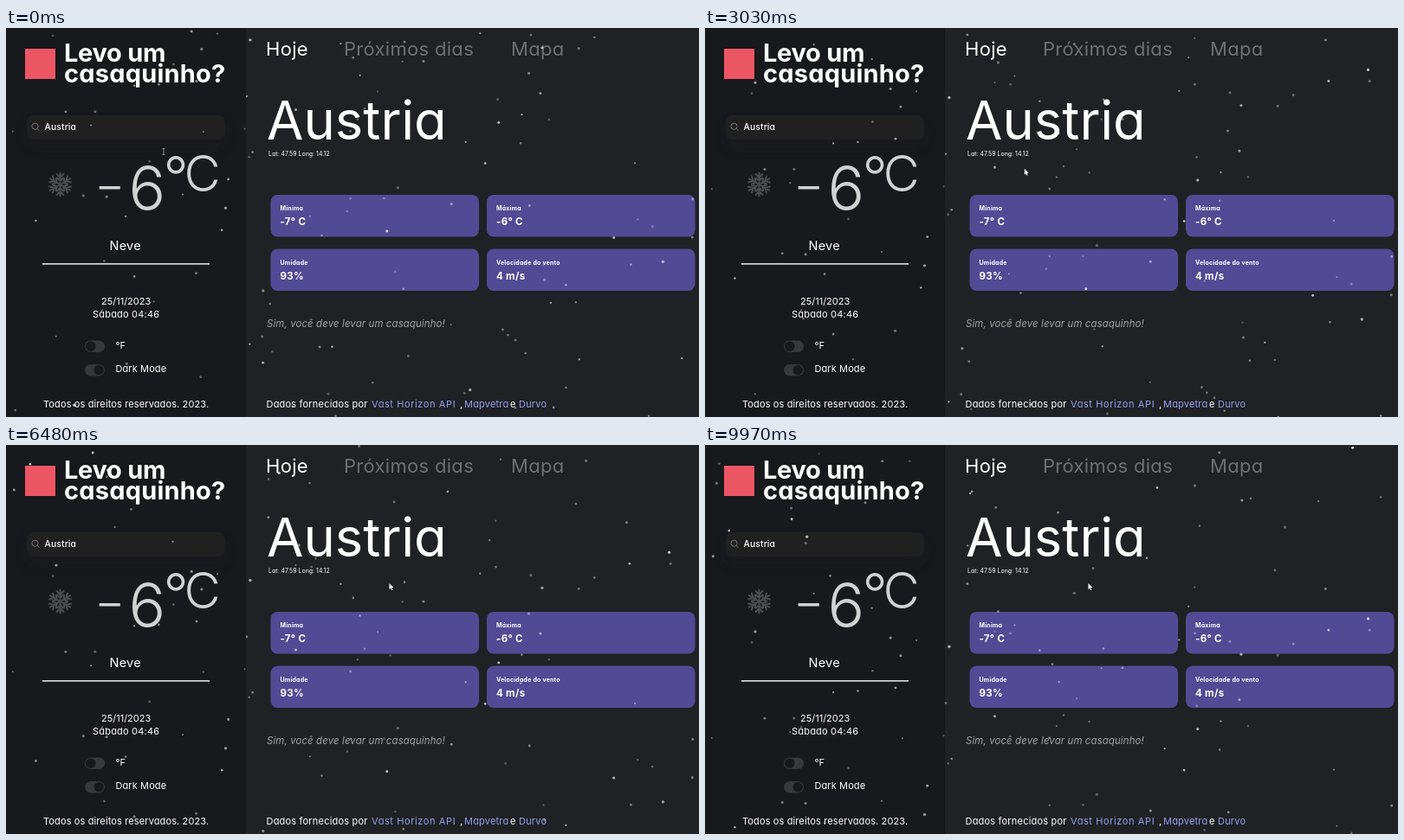
An HTML page with a canvas for the animation above (10 s loop, 800x450 px).

```html
<!DOCTYPE html>
<html lang="pt">
<head>
<meta charset="utf-8">
<title>Levo um casaquinho?</title>
<style>
html, body { margin: 0; width: 100%; height: 100%; overflow: hidden; background: #202124; }
svg, canvas { position: absolute; left: 0; top: 0; width: 800px; height: 450px; }
text {
  font-family: Inter, "Open Sans", sans-serif;
  font-feature-settings: "cv11";
  font-size: 11px;
  fill: #fff;
}
.title { font-size: 29px; font-weight: 700; }
.search { font-size: 10.3px; font-weight: 500; letter-spacing: .15px; }
.temp text { font-weight: 300; fill: #d2d2d2; }
.temp .minus { font-size: 84px; font-weight: 200; }
.temp .digit { font-size: 71px; }
.temp .degree { font-size: 64px; }
.temp .unit { font-size: 58px; }
.sky { font-size: 14.5px; letter-spacing: .25px; }
.tab { font-size: 22px; letter-spacing: .3px; }
.off { fill: #6e6f71; }
.place { font-size: 61.5px; }
.tiny { font-size: 7px; }
.card { fill: #534a95; }
.label { font-size: 7px; font-weight: 700; letter-spacing: .2px; }
.value { font-size: 11.5px; font-weight: 700; letter-spacing: .3px; }
.note { font-size: 11.4px; font-style: italic; fill: #a2a2a3; letter-spacing: .13px; }
.foot { letter-spacing: .2px; }
.link { fill: #939fee; }
</style>
</head>
<body>
<svg viewBox="0 0 800 450">
  <defs>
    <filter id="soft" x="-20%" y="-80%" width="140%" height="260%"><feGaussianBlur stdDeviation="7"/></filter>
    <path id="arm" d="M0 0V-13.5M-4 -12L0 -8L4 -12M-3.6 -7.6L0 -4.4L3.6 -7.6"/>
  </defs>

  <rect width="277" height="450" fill="#18191c"/>
  <rect x="22" y="24" width="35" height="35" fill="#ec5564"/>
  <text class="title" x="67" y="39" letter-spacing="-.3">Levo um</text>
  <text class="title" x="67" y="63" letter-spacing=".2">casaquinho?</text>

  <rect x="24" y="110" width="229" height="28" rx="10" fill="#1f1f20" opacity=".35" filter="url(#soft)"/>
  <rect x="24" y="101" width="229" height="28" rx="8" fill="#202020"/>
  <g fill="none" stroke="#858585" stroke-width=".8">
    <circle cx="33.5" cy="113.7" r="3.6"/>
    <path d="M36.2 116.4L38.6 118.8"/>
  </g>
  <text class="search" x="44.5" y="118">Austria</text>

  <g id="icon" transform="translate(62.5 181)" fill="none" stroke="#4c4d50" stroke-width="2" stroke-linecap="round"></g>
  <g class="temp">
    <text class="minus" x="101" y="211">-</text>
    <text class="digit" x="141.5" y="210.5">6</text>
    <text class="degree" x="181.5" y="195">°</text>
    <text class="unit" x="205.5" y="188.5">C</text>
  </g>

  <text class="sky" x="119.5" y="257">Neve</text>
  <rect x="42" y="272.2" width="193" height="1.4" fill="#fff"/>
  <text x="110" y="319.5">25/11/2023</text>
  <text x="100" y="335" letter-spacing=".2">Sábado 04:46</text>

  <g id="toggles"></g>
  <text x="126.5" y="371">°F</text>
  <text x="126.5" y="398" letter-spacing=".1">Dark Mode</text>
  <text x="43" y="439" letter-spacing=".12">Todos os direitos reservados. 2023.</text>

  <text class="tab" x="300" y="32">Hoje</text>
  <text class="tab off" x="390" y="32">Próximos dias</text>
  <text class="tab off" x="583" y="32">Mapa</text>
  <text class="place" x="301" y="129">Austria</text>
  <text class="tiny" x="303" y="148">Lat: 47.59 Long: 14.12</text>

  <g id="cards"></g>

  <text class="note" x="301" y="346">Sim, você deve levar um casaquinho!</text>
  <g class="foot">
    <text x="300.5" y="439">Dados fornecidos por</text>
    <text class="link" x="422" y="439" letter-spacing=".6">Vast Horizon API</text>
    <text x="524" y="439">,</text>
    <text class="link" x="529" y="439">Mapvetra</text>
    <text x="582" y="439">e</text>
    <text class="link" x="592" y="439">Durvo</text>
  </g>
</svg>
<canvas id="snow" width="800" height="450"></canvas>

<script>
const LOOP = 10000, W = 800, H = 450, FALL = 22;
const byId = id => document.getElementById(id);
const ctx = byId('snow').getContext('2d');

const facts = [['Mínima', '-7° C'], ['Máxima', '-6° C'], ['Umidade', '93%'], ['Velocidade do vento', '4 m/s']];
byId('cards').innerHTML = facts.map(([label, value], i) => {
  const x = 305.5 + (i % 2) * 249.5, y = 193 + (i >> 1) * 62.5;
  return `<rect class="card" x="${x}" y="${y}" width="240.5" height="48.5" rx="8"/>
    <text class="label" x="${x + 11}" y="${y + 18}">${label}</text>
    <text class="value" x="${x + 11}" y="${y + 35}">${value}</text>`;
}).join('');

byId('toggles').innerHTML = [false, true].map((on, i) => {
  const y = 368.2 + i * 27.5;
  return `<rect x="91" y="${y - 6.75}" width="23" height="13.5" rx="6.75" fill="#37383b"/>
    <circle cx="${on ? 107.2 : 97.8}" cy="${y}" r="5.7" fill="#18191c"/>`;
}).join('');

for (let a = 0; a < 360; a += 60) byId('icon').innerHTML += `<use href="#arm" transform="rotate(${a})"/>`;

let seed = 11;
const rand = () => (seed = (seed * 16807) % 2147483647) / 2147483647;

// Flakes fill the stage and the strip above it that falls into view
const drop = FALL * LOOP / 1000;
const flakes = Array.from({ length: 165 }, () => {
  const glow = rand() ** 4;
  return {
    x: rand() * W,
    y: rand() * (H + drop) - drop,
    r: 1 + rand() * .6 + glow * .2,
    a: .25 + rand() * .2 + glow * .45
  };
});

function drawSnow(t) {
  ctx.fillStyle = '#fff';
  for (const { x, y, r, a } of flakes) {
    ctx.globalAlpha = a;
    ctx.beginPath();
    ctx.arc(x, y + FALL * t / 1000, r, 0, Math.PI * 2);
    ctx.fill();
  }
  ctx.globalAlpha = 1;
}

// Mouse stops: time, x, y
const stops = [[0, 182, 143], [2270, 254, 159], [3820, 491, 173], [4970, 447, 170], [6000, 443, 163], [LOOP, 443, 163]];

function mouseAt(t) {
  const i = stops.findIndex(([end]) => end > t);
  const [t0, x0, y0] = stops[i - 1], [t1, x1, y1] = stops[i];
  const u = (t - t0) / (t1 - t0), e = u * u * (3 - 2 * u);
  return [x0 + (x1 - x0) * e, y0 + (y1 - y0) * e];
}

const beam = new Path2D('M-1.5 -3.5H1.5M0 -3.5V3.5M-1.5 3.5H1.5');
const arrow = new Path2D('M-.5 -3V4L1.2 2.6L2.4 5L3.4 4.5L2.3 2.1L4.4 2Z');

function drawMouse(t) {
  const [x, y] = mouseAt(t);
  ctx.save();
  ctx.translate(x, y);
  if (x < 200) {
    ctx.strokeStyle = '#aaa';
    ctx.lineWidth = .8;
    ctx.stroke(beam);
  } else {
    ctx.fill(arrow);
  }
  ctx.restore();
}

function draw() {
  const t = performance.now() % LOOP;
  ctx.clearRect(0, 0, W, H);
  drawSnow(t);
  drawMouse(t);
  requestAnimationFrame(draw);
}
draw();
</script>
</body>
</html>
```
